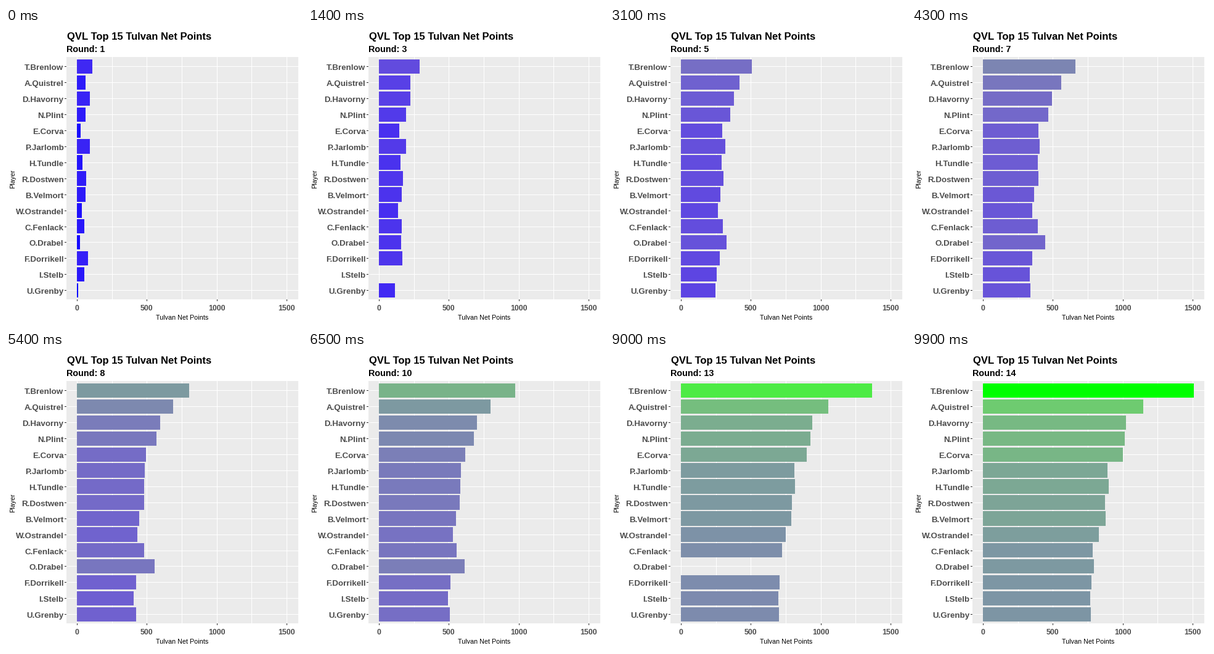
Write a matplotlib script that moves like this. It is 480 px wide and 480 px high and loops after 10000 ms.

```python
import numpy as np
import matplotlib.pyplot as plt
from matplotlib.animation import FuncAnimation
from matplotlib.patches import Rectangle

SIZE, DPI, FRAMES, ROUNDS = 480, 96, 100, 14
LEFT, RIGHT, TOP, BOTTOM = 98, 474, 47, 440
LOW_SCORE, TOP_SCORE = 8, 1507
BAR_LEFT = 115
X0, SCALE = 115.1, (RIGHT - LEFT) / 1.1 / TOP_SCORE
FIRST_ROW, ROW_STEP = 62.95, 25.91
GREY = "#4D4D4D"

# Points after the first, eighth and last round
KEY_FRAMES = 0, 54, FRAMES - 1
PLAYERS = {
    "T.Brenlow": (110, 802, 1507),
    "A.Quistrel": (61, 687, 1146),
    "D.Havorny": (92, 595, 1022),
    "N.Plint": (61, 568, 1014),
    "E.Corva": (26, 493, 1000),
    "P.Jarlomb": (92, 485, 890),
    "H.Tundle": (39, 480, 899),
    "R.Dostwen": (66, 480, 872),
    "B.Velmort": (61, 445, 877),
    "W.Ostrandel": (35, 432, 828),
    "C.Fenlack": (52, 480, 784),
    "O.Drabel": (22, 555, 793),
    "F.Dorrikell": (79, 423, 775),
    "I.Stelb": (52, 405, 767),
    "U.Grenby": (8, 423, 771),
}
# Spans of frames in which a player has no bar
ABSENT = {"I.Stelb": range(1, 23), "O.Drabel": range(85, 99)}

# CIE Lab ends of the colour scale
BLUE = np.array([32.30, 79.19, -107.86])
GREEN = np.array([87.73, -86.18, 83.18])
WHITE_POINT = np.array([0.95047, 1.0, 1.08883])
XYZ_TO_RGB = np.array([[3.2405, -1.5371, -0.4985],
                       [-0.9693, 1.8760, 0.0416],
                       [0.0556, -0.2040, 1.0572]])


def lab_to_rgb(lab):
    fy = (lab[0] + 16) / 116
    f = np.array([fy + lab[1] / 500, fy, fy - lab[2] / 200])
    xyz = np.where(f > 6 / 29, f ** 3, (f - 4 / 29) * 3 * (6 / 29) ** 2)
    lin = np.clip(XYZ_TO_RGB @ (xyz * WHITE_POINT), 0, 1)
    return np.where(lin <= 0.0031308, 12.92 * lin,
                    1.055 * lin ** (1 / 2.4) - 0.055).clip(0, 1)


def fill(score):
    t = (score - LOW_SCORE) / (TOP_SCORE - LOW_SCORE)
    return lab_to_rgb(BLUE + t * (GREEN - BLUE))


fig = plt.figure(figsize=(SIZE / DPI, SIZE / DPI), dpi=DPI, facecolor="white")
ax = fig.add_axes([0, 0, 1, 1])
ax.set_xlim(0, SIZE)
ax.set_ylim(SIZE, 0)
ax.axis("off")


def box(x, y, w, h, color, z=1):
    return ax.add_patch(Rectangle((x, y), w, h, facecolor=color, linewidth=0,
                                  antialiased=False, zorder=z))


def label(x, y, text, px, color="black", weight="bold", **kw):
    kw.setdefault("va", "baseline")
    return ax.text(x, y, text, fontsize=px * 72 / DPI, color=color,
                   family="Liberation Sans", weight=weight, zorder=5, **kw)


box(LEFT, TOP, RIGHT - LEFT, BOTTOM - TOP, "#EBEBEB")
for value in range(0, 1501, 250):
    x = int(X0 + value * SCALE + 0.3)
    box(x, TOP, 1, BOTTOM - TOP, "white", 2)
    if value % 500 == 0:
        box(x, BOTTOM, 1, 3, "#333333", 2)
        label(x, 458, str(value), 12.2, GREY, ha="center")

bars = {}
for row, name in enumerate(PLAYERS):
    y = FIRST_ROW + row * ROW_STEP
    box(LEFT, int(y), RIGHT - LEFT, 1, "white", 2)
    box(LEFT - 3, int(y), 3, 1, "#333333", 2)
    label(93.5, int(y) + 6, name, 13.4, GREY, ha="right")
    top, base = round(y - 12.05), round(y + 11.4)
    bars[name] = box(BAR_LEFT, top, 0, base - top, "blue", 3)

label(98.7, 19, "QVL Top 15 Tulvan Net Points", 16.6)
round_text = label(98.4, 39, "", 14.4)
label(286, 473, "Tulvan Net Points", 10.7, weight="normal", ha="center")
label(16.5, 245, "Player", 10.7, weight="normal", rotation=90,
      ha="right", va="center")


def update(i):
    for name, bar in bars.items():
        score = np.interp(i, KEY_FRAMES, PLAYERS[name])
        bar.set_visible(i not in ABSENT.get(name, ()))
        bar.set_width(round(X0 + score * SCALE) - BAR_LEFT)
        bar.set_facecolor(fill(score))
    round_text.set_text(f"Round: {round(1 + (ROUNDS - 1) * i / (FRAMES - 1))}")
    return [*bars.values(), round_text]


anim = FuncAnimation(fig, update, frames=FRAMES, interval=100,
                     repeat=True, repeat_delay=0, blit=False)
plt.show()
```
